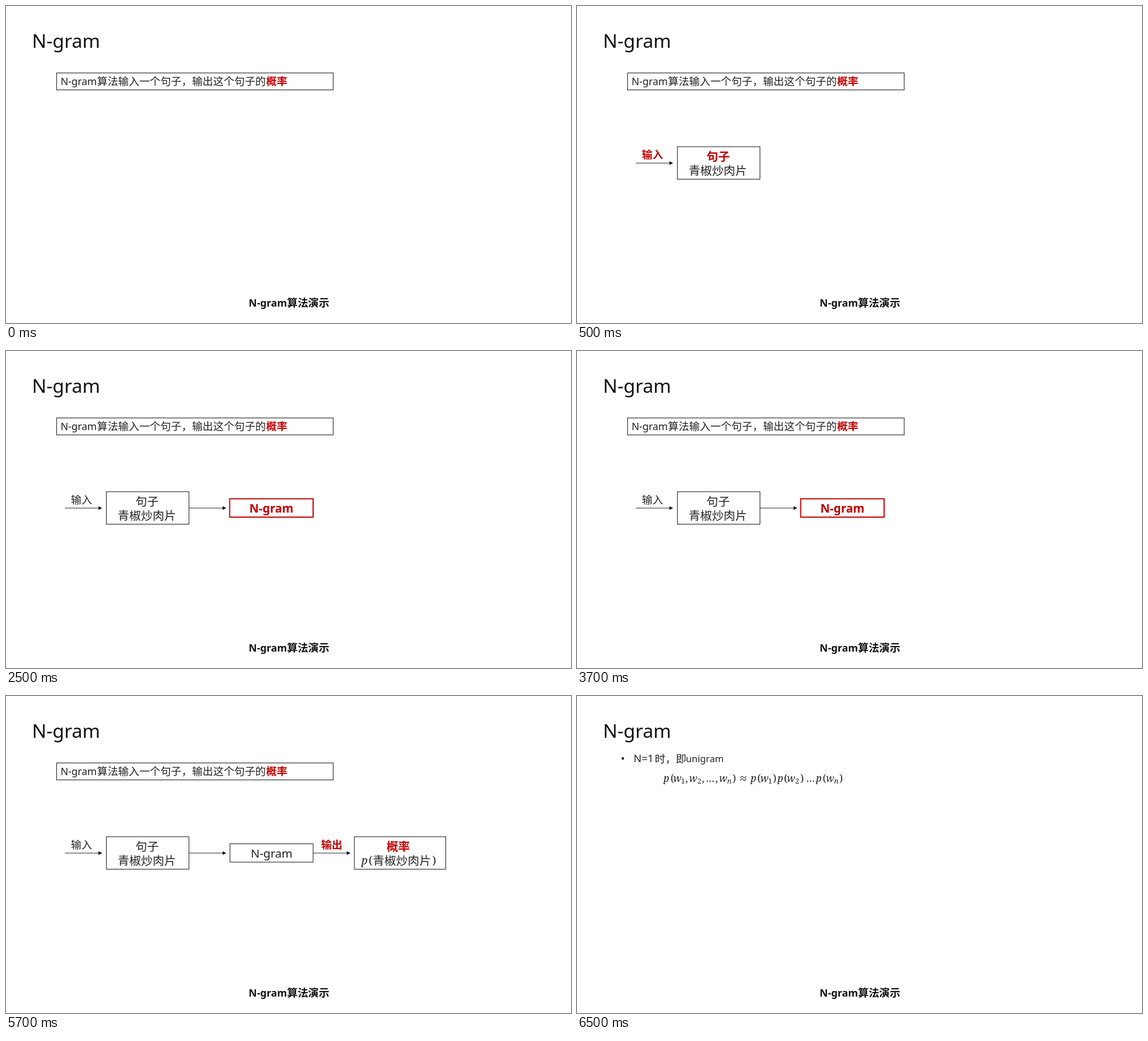
Write an HTML page that moves like this. It is 999 px wide and 561 px high and loops after 8000 ms.

```html
<!DOCTYPE html>
<html lang="zh-CN">
<head>
<meta charset="utf-8">
<title>N-gram</title>
<style>
html, body { margin: 0; width: 100%; height: 100%; overflow: hidden; background: #fff; }
svg { display: block; width: 100vw; height: 100vh; }
text { font: 400 17.9px "Noto Sans", "Open Sans", sans-serif; fill: #222; }
.title { font-size: 33.6px; font-weight: 300; fill: #111; }
.cjk { font: 300 18.67px "Noto Sans CJK SC", "Noto Sans CJK", sans-serif; }
.mid { text-anchor: middle; }
.big { font-size: 20.6px; }
.bold { font-weight: 700; fill: #111; }
.red { fill: #c00000; font-weight: 700; }
.math text { font: 17.5px "Noto Serif", serif; text-anchor: middle; }
.math .it { font-style: italic; }
.math .sub { font-size: 13px; }
.math .wide { font-size: 22px; }
rect, .line { fill: none; stroke: #222; stroke-width: 1.1; }
</style>
</head>
<body>
<svg viewBox="0 0 999 561">
  <defs>
    <g id="arrow"><path class="line" d="M0 0H61"/><path d="M59.5 -3.2L66 0L59.5 3.2Z" fill="#111"/></g>
  </defs>

  <text class="title" x="46" y="73.5">N-gram</text>
  <text class="mid bold" x="463" y="532">N-gram</text>
  <text class="cjk bold" x="497" y="532">算法演示</text>

  <g data-span="0 6500">
    <rect x="89.5" y="118.5" width="489" height="30"/>
    <text class="mid" x="128.5" y="139.5">N-gram</text>
    <text class="cjk" x="161" y="140">算法输入一个句子，输出这个句子的</text>
    <text class="cjk red" x="460" y="140">概率</text>
  </g>

  <g data-span="500 6500">
    <use href="#arrow" x="104" y="278"/>
    <rect x="177.5" y="249" width="146" height="57.5"/>
    <text class="cjk mid big" x="249" y="298.5">青椒炒肉片</text>
  </g>
  <g data-span="500 2500">
    <text class="cjk mid red" x="133.5" y="269.5">输入</text>
    <text class="cjk mid big red" x="249.5" y="273.5">句子</text>
  </g>

  <g data-span="2500 6500">
    <text class="cjk mid" x="133.5" y="269.5">输入</text>
    <text class="cjk mid big" x="249.5" y="273.5">句子</text>
    <use href="#arrow" x="323.5" y="278"/>
  </g>
  <g data-span="2500 4500">
    <rect x="395.5" y="261.5" width="147.5" height="32.5" style="stroke:#c00000;stroke-width:2"/>
    <text class="mid big red" x="469.3" y="285.5">N-gram</text>
  </g>

  <g data-span="4500 6500">
    <rect x="396" y="261.5" width="147" height="32.5"/>
    <text class="mid big" x="469.7" y="285.5">N-gram</text>
    <use href="#arrow" x="543" y="278"/>
    <text class="cjk mid red" x="576" y="269.5">输出</text>
    <rect x="616" y="249" width="161.5" height="57.5"/>
    <text class="cjk mid big red" x="693.5" y="273.5">概率</text>
    <g class="math">
      <text class="it" x="634" y="297.5" style="font-size:19.5px">p</text>
      <text x="644.5" y="297.5" style="font-size:19.5px">(</text>
      <text x="757" y="297.5" style="font-size:19.5px">)</text>
    </g>
    <text class="cjk mid big" x="700" y="298.5">青椒炒肉片</text>
  </g>

  <g data-span="6500 8000">
    <circle cx="81" cy="110.5" r="2.2" fill="#111"/>
    <text x="100" y="117" style="font-size:18.67px">N=1</text>
    <text class="cjk" x="137.5" y="117.5">时，即</text>
    <text class="mid" x="226" y="117" style="font-size:16.8px">unigram</text>
    <g class="math" id="formula"></g>
  </g>
</svg>
<script>
const LOOP = 8000;
const formula = document.getElementById('formula');

// Places symbols by their centres, cycling through the given characters.
function put(symbols, centres, kind, y) {
  centres.forEach((x, i) => {
    const t = document.createElementNS('http://www.w3.org/2000/svg', 'text');
    t.setAttribute('class', kind);
    t.setAttribute('x', x);
    t.setAttribute('y', y);
    t.textContent = symbols[i % symbols.length];
    formula.append(t);
  });
}
put('p', [158, 312, 359.5, 427.5], 'it', 151.5);
put('w', [177.5, 205.5, 258.5, 331.5, 378.5, 447.5], 'it', 151.5);
put('(', [168.5, 322, 369, 437.5], '', 151.5);
put(')', [278, 349.5, 398, 467], '', 151.5);
put(',', [194, 223, 247], '', 151.5);
put('…', [235.5, 413], '', 151.5);
put('≈', [294], 'wide', 153);
put('12', [187.5, 216.5, 341.5, 389.5], 'sub', 155);
put('n', [269.5, 458.5], 'it sub', 155);

const parts = [...document.querySelectorAll('[data-span]')].map(el => {
  const [start, end] = el.dataset.span.split(' ').map(Number);
  return { el, start, end };
});
const begin = performance.now();

function draw(now) {
  const t = Math.max(0, now - begin) % LOOP;
  for (const { el, start, end } of parts)
    el.style.display = t >= start && t < end ? '' : 'none';
  requestAnimationFrame(draw);
}
draw(begin);
</script>
</body>
</html>
```
